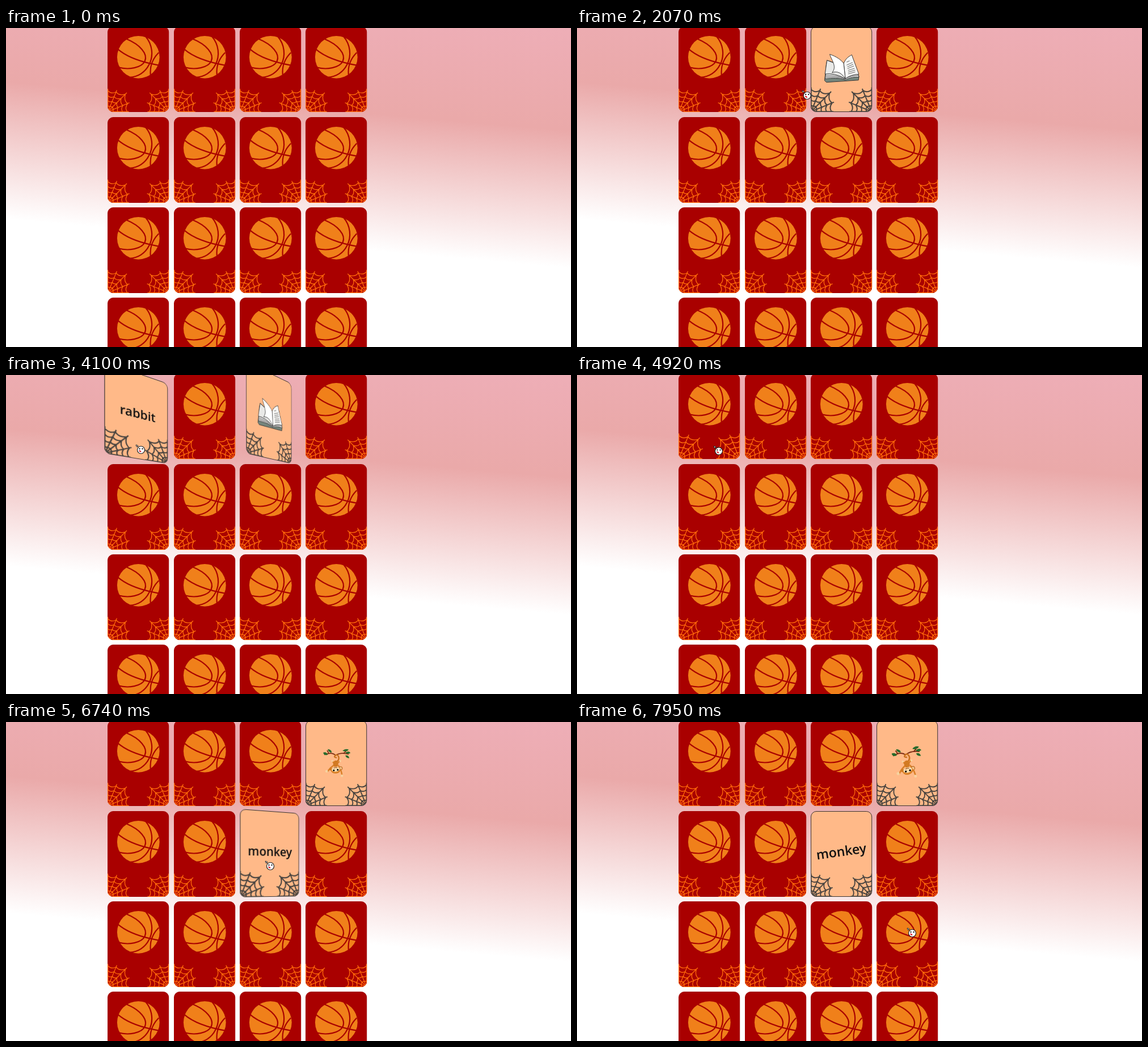
An HTML page for the animation above (8000 ms loop, 996 by 562 pixels).

```html
<!DOCTYPE html>
<html lang="en">
<head>
<meta charset="utf-8">
<title>Memory cards</title>
<style>
  html, body { margin: 0; width: 100%; height: 100%; overflow: hidden; background: #fff; }
  #stage { position: absolute; left: 0; top: 0; width: 996px; height: 562px; overflow: hidden;
    perspective: 570px; perspective-origin: 498px 281px; }
  #sky, #cursor { position: absolute; left: 0; top: 0; }
  .card { position: absolute; width: 108.2px; height: 151px; }
  .card svg { display: block; overflow: visible; }
  .word { font: 600 21px "Comic Sans MS", "Open Sans", sans-serif; text-anchor: middle; fill: #111; }
</style>
</head>
<body>
<div id="stage">
  <svg id="sky" width="996" height="562">
    <defs>
      <linearGradient id="pink" gradientUnits="userSpaceOnUse" x1="7.6" y1="-87" x2="-29" y2="334">
        <stop offset="0" stop-color="#eeaeb7"/>
        <stop offset=".43" stop-color="#eaa9a9"/>
        <stop offset="1" stop-color="#fff"/>
      </linearGradient>
      <clipPath id="round"><rect width="108.2" height="151" rx="10"/></clipPath>
      <g id="ball">
        <circle r="37.4" fill="#f0801a"/>
        <g fill="none" stroke="#a90000" stroke-width="2.2">
          <path d="M-36-14C-20 0 6 9 37 14.500"/>
          <path d="M-21-32C3-22 17-6 11.500 7C6 19-17 23-35 18"/>
          <path d="M13-36C25-22 27-2 19 13C12 27-1 35-15 35.500"/>
          <path d="M36-8C25 3 20 16 21.500 31"/>
        </g>
      </g>
      <g id="book" stroke="#333" stroke-width=".9" stroke-linejoin="round">
        <path d="M-25-10L-29 20L-26 23L28 21L29 14Z" fill="#75857c"/>
        <path d="M-24-14L-28 17C-16 16-5 16 6 20C14 16 22 15 29 16L27 8L-18-12Z" fill="#ddd"/>
        <path d="M-27 12Q-8 11 6 18Q18 12 29 13M-27 14.500Q-8 13.500 6 19" fill="none" stroke-width=".6"/>
        <path d="M4-8C8-17 13-19 18-22L29 11Q15 11 6 18Z" fill="#f6f6f4"/>
        <path d="M-24-14L-28 9Q-12 7 6 18L0-4Z" fill="#e9e9e7"/>
        <path d="M-19-24C-8-20 0-14 4-8L6 18C0 8-7 4-16 7C-7-3-16-13-19-24Z" fill="#fff"/>
        <path d="M9-10l5-2M9-5l10-4M10-2l10-4M10 1l11-4M11 4l11-3M11 7l12-3M11 10l12-3" stroke-width=".7"/>
      </g>
      <g id="monkey">
        <path d="M-21-13Q-8-19-1-12Q8-18 22-14M-13-15l-3-6M12-15l5-4" fill="none" stroke="#7a2c14" stroke-width="1.7"/>
        <path d="M-23-17q6-2 8 4q-7 2-8-4M-15-23q7 1 7 6q-6 0-7-6M11-20q5-5 11-2q-4 5-11 2M16-17q7-4 9 1q-6 3-9-1M16-12q6-1 7 5q-6 0-7-5" fill="#276b2c"/>
        <path d="M1-1C8-6 3-16-2-12Q-5-8 1-8" fill="none" stroke="#c8701d" stroke-width="2.3"/>
        <path d="M-4 5Q-10 9-15 16M4 6Q9 14 10 22M-4 2L-7-2M3 1L6-2" fill="none" stroke="#d98128" stroke-width="2.4" stroke-linecap="round"/>
        <g fill="#f6d3a0">
          <circle cx="-17" cy="16" r="2.4"/><circle cx="10" cy="24" r="2.2"/>
          <circle cx="-7" cy="-2" r="1.7"/><circle cx="7" cy="-2" r="1.7"/>
        </g>
        <ellipse cx="-1" cy="3" rx="4.500" ry="6" fill="#d27a22"/>
        <g transform="rotate(-8 -1 13)">
          <circle cx="-9.500" cy="11" r="2.600" fill="#d27a22"/>
          <circle cx="8" cy="12" r="2.800" fill="#f3c48c" stroke="#b5651d"/>
          <ellipse cx="-1" cy="14" rx="8.500" ry="6" fill="#d98128"/>
          <ellipse cx="-1" cy="12.500" rx="7" ry="4.300" fill="#f9dcae"/>
          <circle cx="-4.500" cy="14" r="1.500"/><circle cx="2.500" cy="14" r="1.500"/>
          <path d="M-4 10.500q3-2 6 0" fill="none" stroke="#8a3b12"/>
        </g>
      </g>
    </defs>
    <rect width="996" height="562" fill="url(#pink)"/>
  </svg>
  <svg id="cursor" width="20" height="20" style="overflow:visible">
    <path d="M0 0L4 1.500L1.500 4ZM2 2L5 5" fill="#fff" stroke="#222" stroke-width="1"/>
    <circle cx="9" cy="9" r="6.500" fill="#fff" stroke="#222" stroke-width="1.200"/>
    <circle cx="6.500" cy="7" r="1.200" fill="#222"/>
    <circle cx="11.500" cy="7" r="1.200" fill="#222"/>
    <path d="M5 9.500Q9 9.500 9.500 12.500Q6 13.500 5 9.500Z" fill="#d8202c"/>
  </svg>
</div>
<script>
const LOOP = 8000, FLIP = 500, W = 108.2, H = 151;
const COLS = 4, ROWS = 4;
const stage = document.getElementById('stage');
const cursor = document.getElementById('cursor');

// Card index -> flip start times (each one turns the card over) and face content
const flips = { 0: [3075, 4010], 2: [1330, 4010], 3: [5520], 6: [6435] };
const word = w => `<text class="word" y="5">${w}</text>`;
const pic = id => `<use href="#${id}"/>`;
const faces = { 0: word('rabbit'), 2: pic('book'), 3: pic('monkey'), 6: word('monkey') };
const MATCH = 6930, matched = [3, 6];

// Pointer track: time, x, y
const track = [
  [400, 806, 529], [560, 730, 440], [800, 560, 240], [1000, 440, 130], [1120, 398, 108], [1260, 432, 108],
  [1850, 432, 109], [2070, 397, 110], [2400, 300, 118], [2750, 235, 122], [2880, 229, 123],
  [4850, 229, 123], [4920, 240, 125], [5100, 410, 140], [5280, 620, 160], [5360, 667, 165], [5480, 605, 138],
  [5620, 585, 150], [5780, 530, 205], [5910, 487, 238], [6200, 465, 248], [6350, 457, 245],
  [7230, 457, 245], [7480, 490, 280], [7750, 555, 340], [7950, 582, 363]
];

const clamp = v => Math.max(0, Math.min(1, v));

// Same curve as the CSS keyword "ease"
function ease(x) {
  if (x <= 0) return 0;
  if (x >= 1) return 1;
  let lo = 0, hi = 1, s;
  for (let i = 0; i < 20; i++) {
    s = (lo + hi) / 2;
    const bx = .75 * s * (1 - s) + s ** 3;
    if (bx < x) lo = s; else hi = s;
  }
  return .3 * (1 - s) ** 2 * s + 3 * (1 - s) * s * s + s ** 3;
}

function pointer(t) {
  if (t < track[0][0]) return null;
  const i = track.findIndex(k => k[0] > t);
  if (i < 0) return track[track.length - 1].slice(1);
  const [t0, x0, y0] = track[i - 1], [t1, x1, y1] = track[i];
  const f = (t - t0) / (t1 - t0);
  return [x0 + (x1 - x0) * f, y0 + (y1 - y0) * f];
}

// Spider web growing from the origin up and to the right
function webPath() {
  const len = [37, 41, 47, 41, 40];
  const at = (i, f) => {
    const a = i * Math.PI / 8;
    return [len[i] * f * Math.cos(a), -len[i] * f * Math.sin(a)];
  };
  let d = '';
  for (let i = 0; i < 5; i++) d += `M0 0L${at(i, 1)}`;
  for (const f of [.26, .48, .7, .92]) {
    d += `M${at(0, f)}`;
    for (let i = 1; i < 5; i++) {
      const p = at(i - 1, f), q = at(i, f);
      d += `Q${(p[0] + q[0]) * .42},${(p[1] + q[1]) * .42} ${q}`;
    }
  }
  return d;
}
const WEB = webPath();

const side = (fill, edge, web, width, art) => `
  <g class="side">
    <rect x=".5" y=".5" width="${W - 1}" height="${H - 1}" rx="9.5" fill="${fill}" stroke="${edge}"/>
    <g clip-path="url(#round)" fill="none" stroke="${web}" stroke-width="${width}">
      <path class="web" d="${WEB}"/><path class="web" d="${WEB}"/>
    </g>
    ${art}
  </g>`;

const cards = [];
for (let i = 0; i < COLS * ROWS; i++) {
  const x = 179.1 + (i % COLS) * 116.4, y = -2.8 + Math.floor(i / COLS) * 159.4;
  const el = document.createElement('div');
  el.className = 'card';
  el.style.left = x + 'px';
  el.style.top = y + 'px';
  el.innerHTML = `<svg width="${W}" height="${H}">` +
    side('#a90000', '#a00000', '#ff6a0a', 1.3, '<use href="#ball" x="54.3" y="54.3"/>') +
    (faces[i] ? side('#ffb988', '#3c3430', '#4a4540', 1.9, `<g class="art">${faces[i]}</g>`) : '') + '</svg>';
  stage.insertBefore(el, cursor);
  cards.push({
    i, x, y, el,
    sides: el.querySelectorAll('.side'),
    webs: el.querySelectorAll('.web'),
    art: el.querySelector('.art')
  });
}

// Share of the last 240 ms the pointer spent on a card
function hover(c, t) {
  let n = 0;
  for (let k = 0; k < 12; k++) {
    const p = pointer(t - k * 20);
    if (p && p[0] >= c.x && p[0] <= c.x + W && p[1] >= c.y && p[1] <= c.y + H) n++;
  }
  return n / 12;
}

function drawCard(c, t) {
  const h = hover(c, t), s = 1 + .11 * h;
  c.webs.forEach((w, k) => w.setAttribute('transform',
    `translate(${k % 2 ? W - .7 : .7} ${H - .7}) scale(${k % 2 ? -s : s} ${s})`));
  if (!c.art) return;

  const turn = flips[c.i].reduce((p, t0, k) => p + (k % 2 ? -1 : 1) * ease((t - t0) / FLIP), 0);
  const open = turn > .5;
  c.el.style.transform = turn > 0 && turn < 1 ? `rotateY(${(open ? 180 : 0) - 180 * turn}deg)` : 'none';
  c.sides[0].style.display = open ? 'none' : '';
  c.sides[1].style.display = open ? '' : 'none';

  let zoom = 1, tilt = 0;
  if (matched.includes(c.i)) {
    const m = ease(clamp((t - MATCH) / 250));
    zoom += .1 * m;
    tilt = -8 * m;
  } else if (c.i === 2) {
    zoom += .08 * h;
    tilt = -3 * h;
  }
  c.art.setAttribute('transform', `translate(54.2 73.8) rotate(${tilt}) scale(${zoom})`);
}

function draw(t) {
  cards.forEach(c => drawCard(c, t));
  const p = pointer(t);
  cursor.style.display = p ? '' : 'none';
  if (p) cursor.style.transform = `translate(${p[0]}px, ${p[1]}px)`;
}

const start = performance.now();
function tick() {
  draw((performance.now() - start) % LOOP);
  requestAnimationFrame(tick);
}
tick();
</script>
</body>
</html>
```
